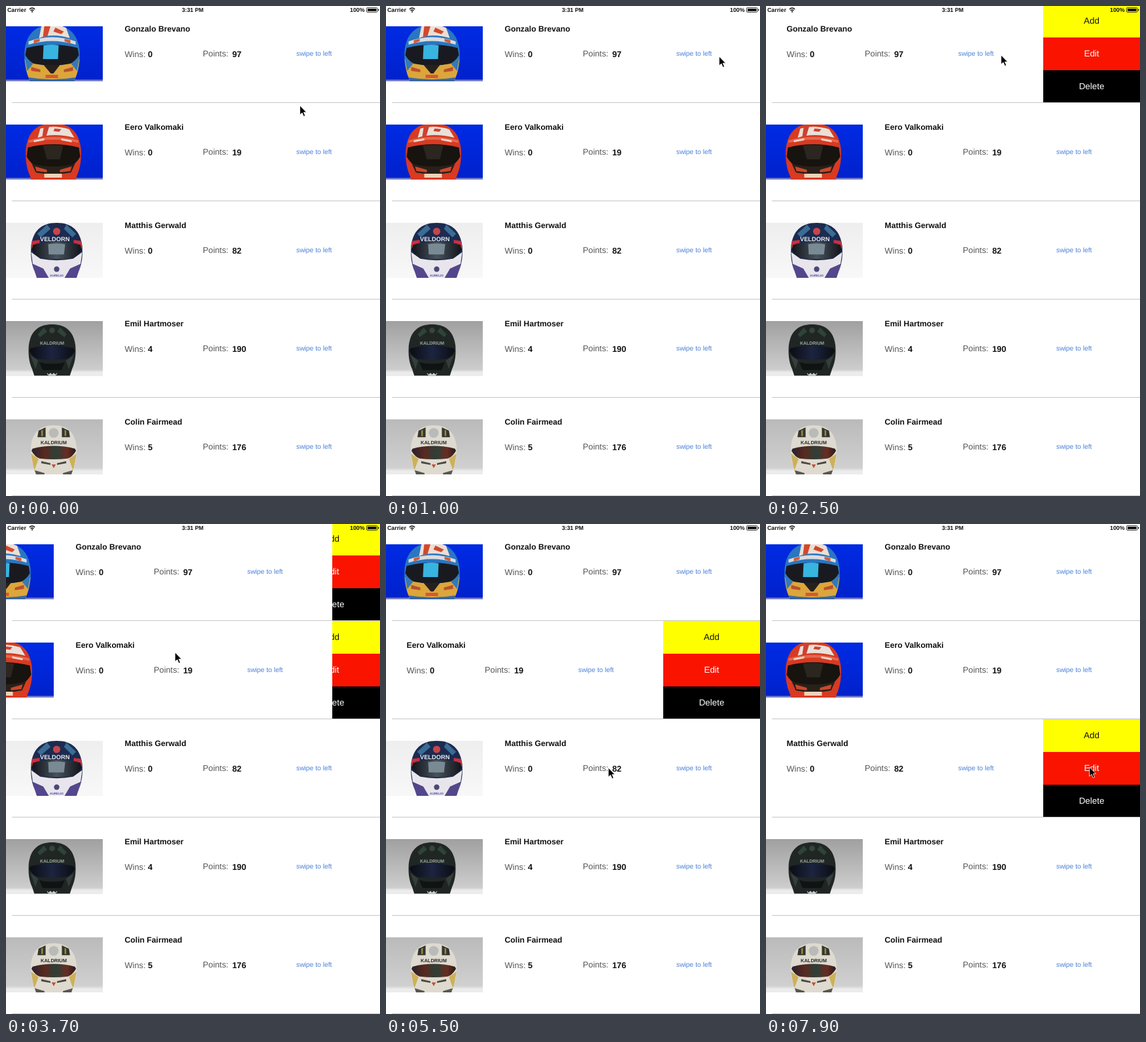
An HTML page that plays this animation: 572 by 748 pixels, repeating every 8000 ms.

```html
<!DOCTYPE html>
<html lang="en">
<head>
<meta charset="utf-8">
<title>Swipe list</title>
<style>
html, body { margin: 0; height: 100%; overflow: hidden; background: #fff; }
svg { display: block; }
text { font-family: "Liberation Sans", Arial, sans-serif; font-size: 12.8px; text-rendering: geometricPrecision; }
.bold { font-weight: bold; fill: #111; }
.name { font-size: 12.2px; }
.label { fill: #555; }
.hint { font-size: 10.3px; fill: #4a80d8; }
.button { font-size: 13.4px; text-anchor: middle; }
.status { font-size: 8.8px; }
.print { font-weight: bold; text-anchor: middle; }
</style>
</head>
<body>
<svg id="stage" width="572" height="748" viewBox="0 0 572 748">
  <defs>
    <linearGradient id="blue" x2="0" y2="1"><stop stop-color="#002ae4"/><stop offset=".96" stop-color="#0022cc"/><stop offset=".98" stop-color="#7c86c4"/></linearGradient>
    <linearGradient id="pale" x2="0" y2="1"><stop stop-color="#eee"/><stop offset="1" stop-color="#f8f8f8"/></linearGradient>
    <linearGradient id="gray" x2="0" y2="1"><stop stop-color="#a0a0a0"/><stop offset=".88" stop-color="#cdcdcd"/><stop offset=".93" stop-color="#ececec"/></linearGradient>
    <linearGradient id="silver" x2="0" y2="1"><stop stop-color="#bababa"/><stop offset=".88" stop-color="#d0d0d0"/><stop offset=".94" stop-color="#ececec"/></linearGradient>
    <linearGradient id="glass"><stop stop-color="#12131a"/><stop offset=".5" stop-color="#48535c"/><stop offset="1" stop-color="#12131a"/></linearGradient>
    <linearGradient id="night"><stop stop-color="#0b0d12"/><stop offset=".5" stop-color="#1c2440"/><stop offset="1" stop-color="#0b0d12"/></linearGradient>
    <linearGradient id="rainbow"><stop stop-color="#28202a"/><stop offset=".3" stop-color="#5a2a20"/><stop offset=".55" stop-color="#2c4038"/><stop offset=".8" stop-color="#6a2c22"/><stop offset="1" stop-color="#201c1c"/></linearGradient>
    <path id="shell" d="M0 0C26 0 39 14 42 38C43 54 42 66 36 80L32 92H-32L-36 80C-42 66 -43 54 -42 38C-39 14 -26 0 0 0Z"/>
    <clipPath id="inside"><use href="#shell"/></clipPath>
  </defs>
  <g id="rows"></g>
  <g id="bar">
    <text class="status bold" x="2" y="9">Carrier</text>
    <text class="status bold" x="285.5" y="9" text-anchor="middle">3:31 PM</text>
    <text class="status bold" x="526" y="9">100%</text>
    <g fill="none" stroke="#111" stroke-width="1.4"><path d="M35.8 5Q40 1.2 44.2 5M37.5 7Q40 4.8 42.5 7"/><circle cx="40" cy="8.7" r=".4"/></g>
    <rect x="551.5" y="2.5" width="16.5" height="7" rx="1.5" fill="none" stroke="#111" stroke-width=".8"/>
    <path d="M553 4H566.5V8H553ZM569 4.7H570.3V7.3H569Z" fill="#111"/>
  </g>
  <path id="cursor" d="M-.5 0V14L2.9 11L5.3 16.5L7.6 15.5L5.3 10.2H9.5Z" stroke="#fff" stroke-width=".8"/>
</svg>
<script>
const visor = (fill, top = 30, bottom = 64) =>
  `<path d="M-39 ${top + 5}Q0 ${top - 5} 39 ${top + 5}L41 ${bottom - 14}Q34 ${bottom - 2} 26 ${bottom}Q0 ${bottom + 3} -26 ${bottom}Q-34 ${bottom - 2} -41 ${bottom - 14}Z" fill="${fill}"/>`;
const shape = (d, fill) => `<path d="${d}" fill="${fill}"/>`;
const dot = (x, y, r, fill) => `<circle cx="${x}" cy="${y}" r="${r}" fill="${fill}"/>`;
const print = (text, y, size, fill) => `<text class="print" y="${y}" style="font-size:${size}px" fill="${fill}">${text}</text>`;

const photo = (background, shell, x, y, scale, art) =>
  `<svg y="31" width="148" height="84"><rect width="148" height="84" fill="${background}"/>
   <g transform="translate(${x} ${y}) scale(${scale})"><use href="#shell" fill="${shell}"/><g clip-path="url(#inside)">${art}</g></g></svg>`;

const photos = [
  photo("url(#blue)", "#2a76c0", 70.5, -2, 1,
    shape("M-16 0H20L27 20Q0 12 -20 20Z", "#eadfd6") + shape("M-12 2L-2 0L-7 17L-14 18ZM5 4L18 10L14 14L2 10Z", "#d2482c") +
    shape("M-36 25Q0 12 36 25V30Q0 19 -36 30Z", "#d9dce0") + shape("M-28 23L-19 21V25L-28 28ZM19 21L28 23V28L19 25Z", "#d45a34") +
    visor("#191a20", 30, 60) + shape("M-13 31Q0 29 10 31L9 52H-14Z", "#38b4e0") +
    shape("M-42 52L-28 59Q0 65 28 59L42 52L36 90H-36Z", "#dca63a") +
    shape("M-42 48L-29 59L-38 70ZM42 48L29 59L38 70Z", "#3479b8") + shape("M-13 61H12L2 74H-2Z", "#26211c") +
    shape("M-32 64L-18 68V72L-32 70ZM32 64L18 68V72L32 70Z", "#b8502e") + shape("M-36 80Q0 86 36 80V90H-36Z", "#3a68a0") + shape("M-10 76H9V81H-10Z", "#d4583a")),
  photo("url(#blue)", "#d83a22", 72.5, -2, 1,
    shape("M-20 8Q0 2 24 9L32 22Q0 14 -24 22Z", "#eae0d8") + shape("M-14 0L-5 0L-11 20L-17 20ZM2 8L12 9L9 13L0 12Z", "#d04030") +
    shape("M-38 26Q0 16 38 26V30Q0 20 -38 30Z", "#e0694e") + shape("M-30 26L-14 23V26L-30 29ZM12 23L28 26V29L12 26Z", "#efd4ca") +
    visor("#17130f", 32, 65) + shape("M-16 34Q0 32 15 34L10 55H-10Z", "#2b261f") +
    shape("M-33 62Q0 70 33 62L27 75Q0 81 -27 75Z", "#292019") + shape("M-28 66L-10 71V75L-26 73ZM28 66L10 71V75L26 73Z", "#c9482c") +
    shape("M-14 77H13V83H-14Z", "#ecd2b8")),
  photo("url(#pale)", "#1c2b50", 77.5, 0, .93,
    shape("M-32 18L-16 3L-10 10L-26 24ZM32 18L16 3L12 10L26 24Z", "#3a6c94") + dot(0, 14, 6, "#c84448") +
    shape("M-42 30L-28 28V40L-42 42ZM42 30L28 28V40L42 42Z", "#c83040") +
    visor("url(#glass)", 31, 58) + shape("M-14 35Q0 33 14 35L12 52H-13Z", "#7a8a94") +
    `<g transform="translate(-3 0)">${print("VELDORN", 30, 10, "#e8eaee")}</g>` +
    shape("M-42 48L-27 59Q0 64 27 59L42 48L36 92H-36Z", "#e8e6ec") +
    shape("M-42 66L-22 75L-12 92H-38ZM42 66L22 75L12 92H38Z", "#54468c") + dot(0, 76, 4.5, "#4a4874") +
    print("AURELIO", 88, 5, "#5550a0")),
  photo("url(#gray)", "#202624", 70.5, 5, .85,
    shape("M-26 18L-15 6L-9 13L-22 23ZM26 18L15 6L9 13L22 23Z", "#2f4438") + dot(0, 11, 5, "#38443e") +
    print("KALDRIUM", 37, 8.2, "#9aa6a2") + visor("url(#night)", 38, 62) +
    shape("M-39 55L-25 65L-30 80ZM39 55L25 65L30 80Z", "#343e3b") + shape("M-23 68Q0 74 23 68L17 82H-17Z", "#101314") +
    shape("M-9 87L-6 90L-3 87L0 90L3 87L6 90L9 87V89L6 92H-6L-9 89Z", "#c7cecb")),
  photo("url(#silver)", "#dedacf", 73, 9, .83,
    shape("M-28 10L-15 4V22L-30 22ZM28 10L15 4V22L30 22Z", "#34362e") + shape("M-23 10L-20 8V20H-23ZM23 10L20 8V20H23Z", "#9b8a3d") + dot(0, 14, 9, "#b9bbb9") +
    print("KALDRIUM", 35, 9, "#262b2b") + visor("url(#rainbow)", 38, 61) +
    shape("M-42 52L-28 62L-36 84ZM42 52L28 62L36 84Z", "#cdb05a") + shape("M-23 66L-6 70V73L-23 70ZM23 66L6 70V73L23 70Z", "#4a4842") +
    shape("M-4 72H4L0 79Z", "#c0503c") + shape("M-38 82L-17 88V92H-34ZM38 82L17 88V92H34Z", "#5a564c")),
];

const drivers = [
  ["Gonzalo Brevano", 0, 97],
  ["Eero Valkomaki", 0, 19],
  ["Matthis Gerwald", 0, 82],
  ["Emil Hartmoser", 4, 190],
  ["Colin Fairmead", 5, 176],
];
const buttons = [["Add", "#ff0", "#111"], ["Edit", "#fa1400", "#fff"], ["Delete", "#000", "#fff"]];

const buttonStack = buttons.map(([label, fill, ink], i) =>
  `<rect x="424" y="${i * 50 - 2}" width="148" height="50" fill="${fill}"/>
   <text class="button" x="498" y="${i * 50 + 27}" fill="${ink}">${label}</text>`).join("");

document.getElementById("rows").innerHTML = drivers.map(([name, wins, points], i) =>
  `<g transform="translate(0 ${i * 150})">${buttonStack}
   <g class="cell"><rect y="-2" width="574" height="150" fill="#fff"/>${photos[i]}
   <text class="name bold" x="181.5" y="38.5">${name}</text>
   <text class="label" x="181.5" y="78">Wins:</text><text class="bold" x="217" y="77.5">${wins}</text>
   <text class="label" x="301" y="77">Points:</text><text class="bold" x="346" y="77.5">${points}</text>
   <text class="hint" x="444" y="76">swipe to left</text></g>
   <rect x="9" y="147" width="563" height="1" fill="#c6c6c6"/></g>`).join("");

const cells = document.querySelectorAll(".cell");
const cursor = document.getElementById("cursor");

// time, x, y
const path = [
  [0, 450, 152], [900, 510, 77], [1400, 510, 77], [2200, 360, 75], [2500, 360, 75],
  [3200, 440, 204], [3400, 440, 204], [3700, 259, 196], [4300, 270, 203], [4600, 279, 204],
  [5200, 350, 372], [5400, 350, 372], [6100, 179, 375], [6300, 330, 330], [6800, 478, 326],
  [7400, 478, 326], [7900, 495, 371],
];
const swipes = [1550, 3550, 5650];

const ease = p => { p = Math.min(1, Math.max(0, p)); return p * p * (3 - 2 * p); };
const opened = (row, t) => row in swipes ? ease((t - swipes[row]) / 300) : 0;

function draw(now) {
  const t = Math.floor(now % 8000 / 100) * 100;
  cells.forEach((cell, row) => {
    const slide = 150 * (opened(row, t) - opened(row + 1, t));
    cell.setAttribute("transform", `translate(${-slide} 0)`);
  });
  const next = Math.max(1, path.findIndex(point => point[0] >= t));
  const [from, to] = [path[next - 1], path[next]];
  const p = ease((t - from[0]) / (to[0] - from[0]));
  const [x, y] = [1, 2].map(k => from[k] + (to[k] - from[k]) * p);
  cursor.setAttribute("transform", `translate(${x} ${y})`);
}

const start = performance.now();
function tick() {
  draw(performance.now() - start);
  requestAnimationFrame(tick);
}
tick();
</script>
</body>
</html>
```
